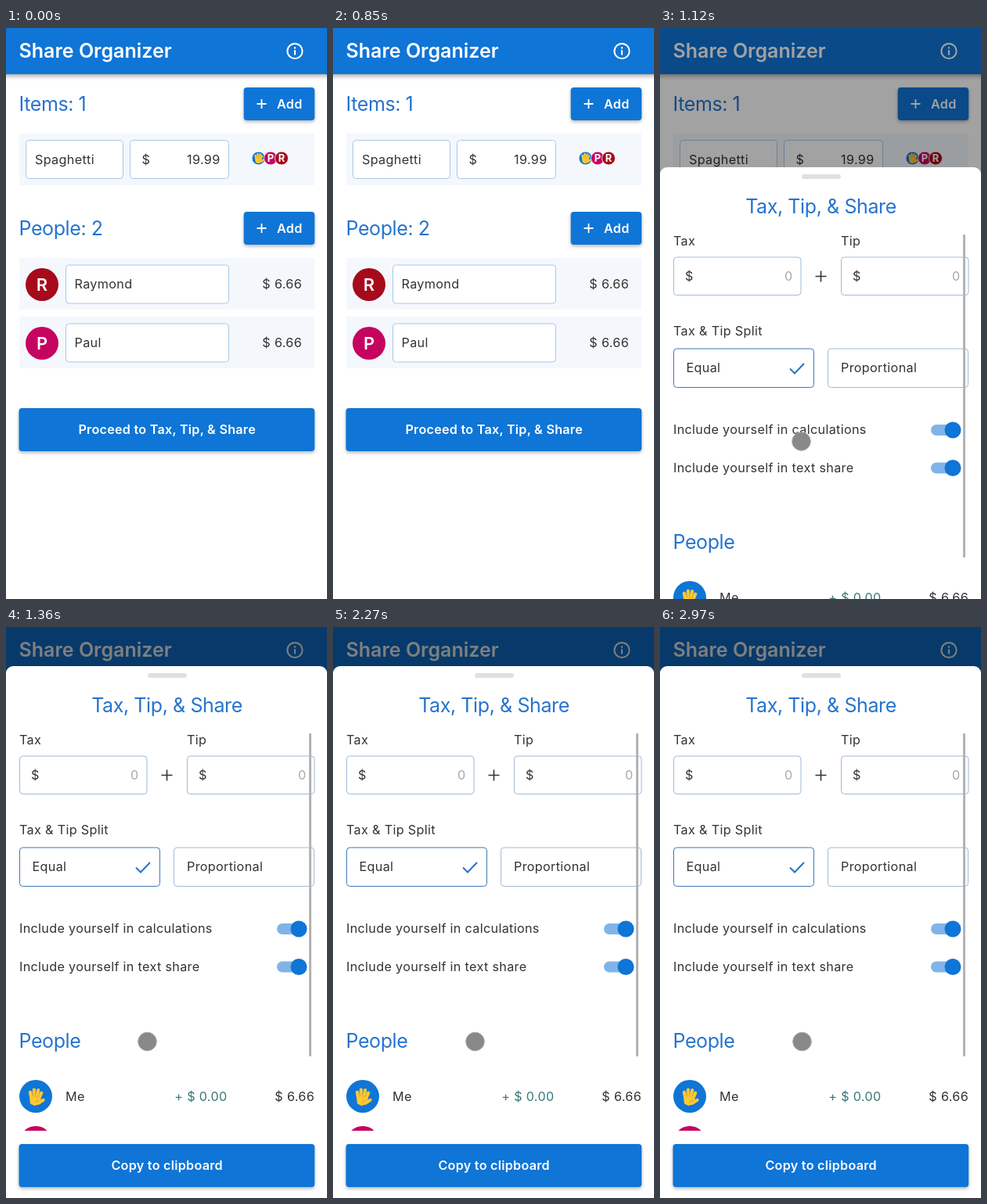
Recreate the animation shown at these times as an HTML page. Size 410x730 px, loop 3 s.

```html
<!DOCTYPE html>
<html lang="en">
<head>
<meta charset="utf-8">
<title>Bill sharing</title>
<style>
html, body { margin: 0; width: 100%; height: 100%; overflow: hidden; background: #fff; }
svg { display: block; width: 410px; height: 730px; }
text { font-family: Inter, Roboto, sans-serif; white-space: pre; }
.body { font-size: 16.2px; letter-spacing: .32px; }
.btn { font-size: 16.2px; font-weight: 600; letter-spacing: .25px; }
.head { font-size: 25px; letter-spacing: -.4px; }
.title { font-size: 25px; font-weight: 600; letter-spacing: 0; }
.face { font-size: 22px; font-weight: 600; }
.mini { font-size: 13px; font-weight: 700; }
.raised { filter: drop-shadow(0 2px 2px rgba(0, 0, 0, .3)); }
.bar { filter: drop-shadow(0 2px 3px rgba(0, 0, 0, .4)); }
</style>
</head>
<body>
<svg id="stage" viewBox="0 0 410 730">
  <g id="main"></g>
  <rect id="shade" width="410" height="730"/>
  <g id="sheet"></g>
  <circle id="touch" r="11.8" fill="#898989" stroke="#a6a6a6"/>
</svg>
<script>
const NS = 'http://www.w3.org/2000/svg';
const $ = id => document.getElementById(id);
const BLUE = '#0f75d6', HEAD = '#2673cd', INK = '#333', PALE = '#f4f8fd';
const RED = '#a60a1b', PINK = '#c5045f', EDGE = '#a9c8e7', SHEET_EDGE = '#a0bad8';
let layer;

function add(tag, attrs, parent = layer) {
  const el = document.createElementNS(NS, tag);
  for (const k in attrs) el.setAttribute(k, attrs[k]);
  return parent.appendChild(el);
}
function text(str, x, y, cls = 'body', fill = INK, anchor = 'start') {
  add('text', { x, y, class: cls, fill, 'text-anchor': anchor }).textContent = str;
}
function box(x, y, width, height, fill, more = {}) {
  return add('rect', { x, y, width, height, fill, ...more });
}
function line(d, stroke, width, more = {}) {
  return add('path', { d, stroke, 'stroke-width': width, fill: 'none', ...more });
}
function disc(cx, cy, r, fill, more = {}) {
  add('circle', { cx, cy, r, fill, ...more });
}
function field(x, y, w, h, stroke = EDGE) {
  box(x + .5, y + .5, w - 1, h - 1, '#fff', { rx: 4, stroke });
}
function button(x, y, w, h) {
  box(x, y, w, h, BLUE, { rx: 4, class: 'raised' });
}
function plus(x, y, r, stroke, width = 2) {
  line(`M${x - r} ${y}h${2 * r}M${x} ${y - r}v${2 * r}`, stroke, width);
}
function addButton(y) {
  button(303.7, y, 90.5, 42);
  plus(326.5, y + 21, 6, '#fff', 1.8);
  text('Add', 346, y + 26.5, 'btn', '#fff');
}
function face(letter, x, y, fill) {
  disc(x, y, 21, fill);
  text(letter, x, y + 8, 'face', '#fff', 'middle');
}
function mini(letter, x, fill) {
  disc(x, 166.5, 8.5, fill, { stroke: '#fff', 'stroke-width': .8 });
  if (letter) text(letter, x, 171.2, 'mini', '#fff', 'middle');
}
function hand(x, y, s) {
  const g = add('g', {
    transform: `translate(${x} ${y}) rotate(12) scale(${s})`,
    stroke: '#fcc934', 'stroke-width': 4, 'stroke-linecap': 'round', fill: 'none'
  });
  add('path', { d: 'M-5 1L-7.5-5M-2 0L-3.5-9M1.5 0L1.5-9.5M4.5 1L6-7M5 6L10 1' }, g);
  add('path', { d: 'M-5 1L5 1L5 5L1 8L-3 7Z', fill: '#fcc934', 'stroke-linejoin': 'round' }, g);
  add('path', { d: 'M-3.4-1L-4.3-5M-.2-1L-.6-6M3-1L3.4-5M1 6Q2 3 5 2.5', stroke: '#d99a1c', 'stroke-width': .8 }, g);
}
function personRow(y, name, fill) {
  box(17, y, 377, 66, PALE);
  face(name[0], 46, y + 34, fill);
  field(76, y + 8.5, 209, 50);
  text(name, 87.5, y + 39);
  text('$ 6.66', 378, y + 39, 'body', INK, 'end');
}
function toggle(y) {
  box(346, y - 7, 34, 14, '#80b4e9', { rx: 7 });
  disc(374, y, 10.5, BLUE);
}
function amount(x) {
  field(x, 164.5, 163.5, 49.5, SHEET_EDGE);
  text('$', x + 15, 195);
  text('0', x + 152.5, 195, 'body', '#a8a8a8', 'end');
}

function buildMain() {
  layer = $('main');
  box(0, 0, 410, 730, '#fff');
  box(-10, -10, 430, 69, BLUE, { class: 'bar' });
  text('Share Organizer', 16.5, 38, 'title', '#fff');
  disc(369, 29.5, 9.6, 'none', { stroke: '#fff', 'stroke-width': 2 });
  line('M369 24.2v2.2M369 28.3v6.2', '#fff', 2.1);

  text('Items: 1', 16.5, 105.5, 'head', HEAD);
  addButton(76);
  box(17, 135, 377, 66, PALE);
  field(25, 143, 125, 50);
  text('Spaghetti', 37, 174);
  field(158, 143, 127, 50);
  text('$', 173.5, 174);
  text('19.99', 273.5, 174, 'body', INK, 'end');
  mini('', 322.5, BLUE);
  hand(322.5, 167, .62);
  mini('P', 338, PINK);
  mini('R', 352, RED);

  text('People: 2', 16.5, 264.5, 'head', HEAD);
  addButton(235);
  personRow(294, 'Raymond', RED);
  personRow(369, 'Paul', PINK);
  button(16.5, 486, 377.7, 55);
  text('Proceed to Tax, Tip, & Share', 205.7, 519, 'btn', '#fff', 'middle');
}

function buildSheet() {
  layer = $('sheet');
  box(0, 50, 410, 760, '#fff', { rx: 9 });
  box(181, 59, 50, 6, '#e0e0e0', { rx: 3 });
  text('Tax, Tip, & Share', 205.5, 108.5, 'head', HEAD, 'middle');
  text('Tax', 17, 150);
  text('Tip', 231, 150);
  amount(17);
  plus(205.5, 189.5, 7, INK, 1.6);
  amount(231);

  text('Tax & Tip Split', 17, 265);
  field(17, 281.5, 180, 50.5, '#3f77b5');
  text('Equal', 33.5, 312);
  line('M166 307.5l6 6l12-12.5', '#2a72c3', 2);
  field(214, 281.5, 180, 50.5, SHEET_EDGE);
  text('Proportional', 231, 312);

  text('Include yourself in calculations', 17, 391);
  toggle(386);
  text('Include yourself in text share', 17, 439.5);
  toggle(434.5);

  text('People', 16.5, 538, 'head', HEAD);
  disc(38, 600, 21, BLUE);
  hand(37.5, 601.5, 1.05);
  text('Me', 76, 605.5);
  text('+ $ 0.00', 282.5, 605.5, 'body', '#3a7878', 'end');
  text('$ 6.66', 394, 605.5, 'body', INK, 'end');
  disc(38, 659, 21, PINK);
  box(0, 644, 410, 160, '#fff');
  button(16.5, 661, 377.7, 55);
  text('Copy to clipboard', 205.7, 694, 'btn', '#fff', 'middle');
  box(387, 136, 3, 413, '#b3b3b3', { rx: 1 });
}

// Cubic bezier timing curve, solved by bisection.
function ease(t, x1, y1, x2, y2) {
  if (t <= 0) return 0;
  if (t >= 1) return 1;
  const curve = (s, a, b) => 3 * s * (1 - s) * (1 - s) * a + 3 * s * s * (1 - s) * b + s * s * s;
  let lo = 0, hi = 1;
  for (let i = 0; i < 24; i++) {
    const mid = (lo + hi) / 2;
    if (curve(mid, x1, x2) < t) lo = mid; else hi = mid;
  }
  return curve(lo, y1, y2);
}

const LOOP = 3000, PRESS = 960, OPEN = 1016.5, SPAN = 225;

function draw(ms) {
  const t = ms % LOOP;
  const p = (t - OPEN) / SPAN;
  const lift = ease(p, 0, 0, .2, 1);
  $('sheet').setAttribute('transform', `translate(0 ${Math.round(680 * (1 - lift))})`);
  $('sheet').setAttribute('visibility', p > 0 ? 'visible' : 'hidden');
  $('shade').setAttribute('opacity', .5 * ease(p, .4, 0, .2, 1));
  const touch = $('touch');
  touch.setAttribute('visibility', t >= PRESS ? 'visible' : 'hidden');
  touch.setAttribute('cx', t < 1400 ? 180.5 : 181.5);
  touch.setAttribute('cy', t < 1180 ? 528.5 : 530);
}

buildMain();
buildSheet();
const start = performance.now();
function tick(now) {
  draw(Math.max(0, now - start));
  requestAnimationFrame(tick);
}
draw(0);
requestAnimationFrame(tick);
</script>
</body>
</html>
```
